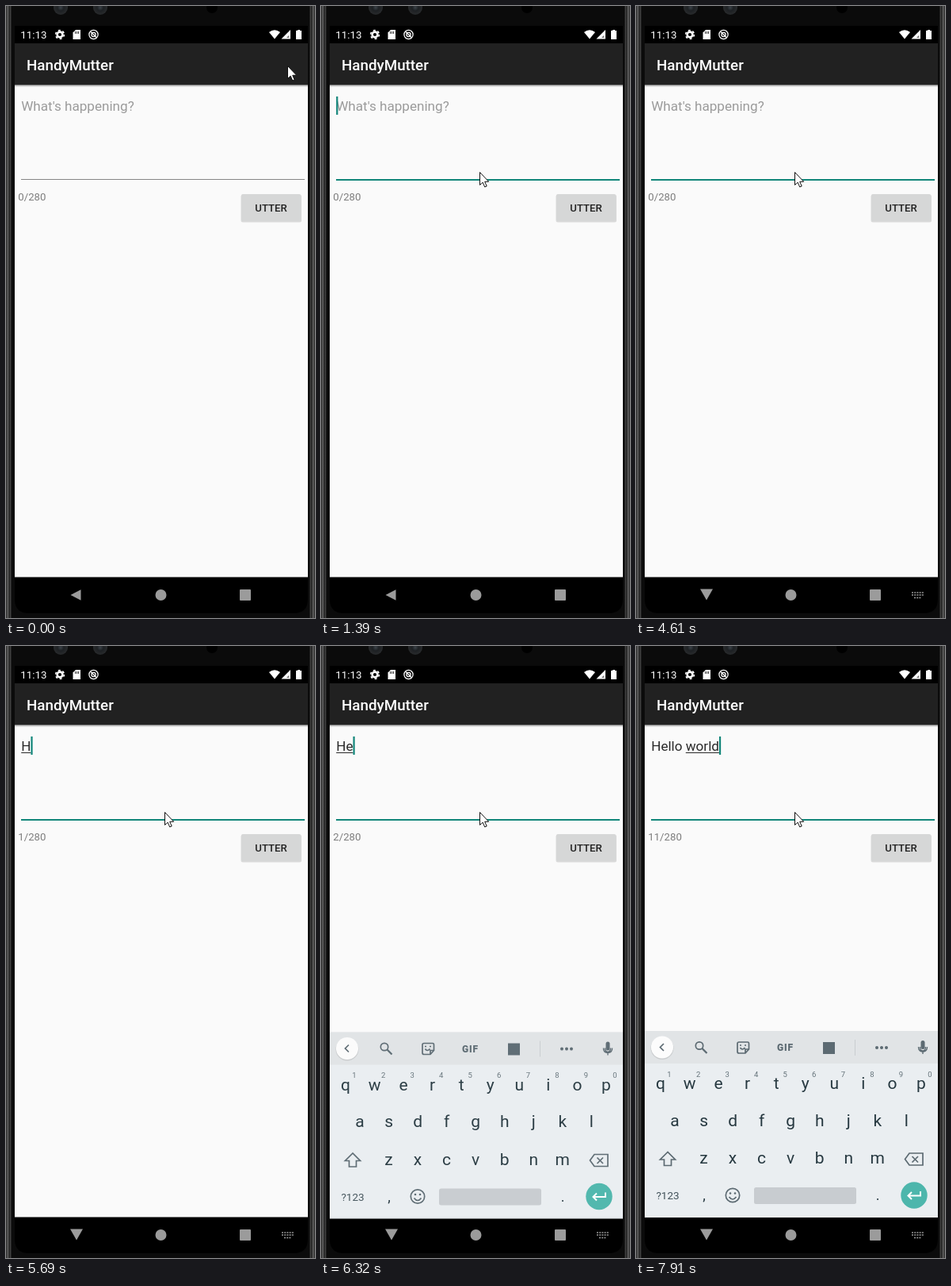
Animation of 390 by 771 pixels, one loop 8 s. Source, as an HTML page:

```html
<!DOCTYPE html>
<html lang="en">
<head>
<meta charset="utf-8">
<title>Composer</title>
<style>
  html, body { margin: 0; width: 100%; height: 100%; overflow: hidden; background: #0b0b0b; }
  svg { display: block; width: 100%; height: 100%; }
  text { font-family: Roboto, sans-serif; white-space: pre; }
  .medium { font-weight: 500; }
  .mid { text-anchor: middle; }
  .line { fill: none; stroke: #5c6a72; stroke-width: 1.7; }
</style>
</head>
<body>
<svg viewBox="0 0 390 771">
  <defs>
    <clipPath id="screen"><path d="M11 25H381V747Q381 765 363 765H29Q11 765 11 747Z"/></clipPath>
    <linearGradient id="barShadow" x2="0" y2="1">
      <stop stop-color="#000" stop-opacity=".3"/><stop offset="1" stop-color="#000" stop-opacity="0"/>
    </linearGradient>
    <linearGradient id="rim">
      <stop stop-color="#2a2a2a"/><stop offset=".35" stop-color="#606060"/>
      <stop offset=".6" stop-color="#1c1c1c"/><stop offset=".82" stop-color="#484848"/>
      <stop offset="1" stop-color="#0b0b0b"/>
    </linearGradient>
    <radialGradient id="lens">
      <stop stop-color="#3b4248"/><stop offset=".45" stop-color="#1d2023"/><stop offset="1" stop-color="#292b2d"/>
    </radialGradient>
  </defs>

  <!-- phone body -->
  <rect width="390" height="771" fill="#0b0b0b"/>
  <rect id="edge" width="7" height="771" fill="url(#rim)"/>
  <use href="#edge" transform="matrix(-1 0 0 1 390 0)"/>
  <circle cx="69" cy="2" r="9" fill="url(#lens)"/>
  <circle cx="119" cy="2" r="9" fill="url(#lens)"/>
  <circle cx="260" cy="2" r="7" fill="#000"/>

  <g clip-path="url(#screen)">
    <rect x="11" y="25" width="370" height="740"/>
    <rect x="11" y="99" width="370" height="620.5" fill="#fafafa"/>
    <rect x="11" y="47" width="370" height="52.500" fill="#212121"/>
    <rect x="11" y="99.500" width="370" height="3" fill="url(#barShadow)"/>

    <!-- status bar -->
    <g fill="#fff">
      <text x="18.300" y="41" font-size="13.300">11:13</text>
      <circle cx="68" cy="36" r="3.4" fill="none" stroke="#fff" stroke-width="2.6"/>
      <circle cx="68" cy="36" r="5.4" fill="none" stroke="#fff" stroke-width="1.6" stroke-dasharray="2.83"/>
      <path d="M88 30H94V42H84.500V33.500Z"/>
      <path d="M87.500 32V35M89.500 32V35M91.500 32V35" stroke="#000" stroke-width=".8"/>
      <g fill="none" stroke="#fff" stroke-width="1.3">
        <circle cx="110.500" cy="36" r="5.6"/><circle cx="110.500" cy="36" r="2.6"/><path d="M107 32.500L114 39.500"/>
      </g>
      <path d="M332 33Q339 27.500 346 33L339 41.500Z"/>
      <path d="M347.500 41.500L359 30V41.500Z"/>
      <path d="M354 40L357 37V40Z" fill="#777"/>
      <path d="M368 30H371V31H373V42H366V31H368Z"/>
      <text class="medium" x="26" y="81" font-size="18.800">HandyMutter</text>
    </g>

    <!-- compose form -->
    <text id="hint" x="19.200" y="132" font-size="17.100" fill="#9b9b9b">What's happening?</text>
    <text id="typed" x="19.200" y="132" font-size="17.100" fill="#2a2a2a"></text>
    <rect id="underline" y="134" height="1" fill="#2a2a2a"/>
    <rect id="caret" y="114" width="2.200" height="23" fill="#12867a"/>
    <rect id="field" x="19" width="358"/>
    <text id="counter" x="15.300" y="245.400" font-size="13.200" fill="#7d7d7d"></text>
    <rect x="296.500" y="237.500" width="76.500" height="35" rx="2.500" fill="#000" opacity=".13"/>
    <rect x="297" y="237" width="75" height="34" rx="2" fill="#d6d7d7"/>
    <text class="medium mid" x="334.500" y="259.300" font-size="13.200" fill="#222">UTTER</text>

    <!-- keyboard -->
    <g id="keyboard" fill="#263840">
      <rect x="11" y="485" width="370" height="235" fill="#eaeef1"/>
      <rect x="11" y="485" width="370" height="41" fill="#e1e4e6"/>
      <circle cx="33" cy="506.500" r="14.500" fill="#000" opacity=".1"/>
      <circle cx="33" cy="505.500" r="14" fill="#fcfcfc"/>
      <g class="line">
        <path d="M35 501L30.500 505.500L35 510"/>
        <circle cx="80" cy="503.500" r="4.700"/><path d="M83.500 507L89.500 513" stroke-width="2.200"/>
        <path d="M130 499H141Q142.500 499 142.500 501V508L138 513H130Q128 513 128 511V501Q128 499 130 499ZM138 513V508H142.500M131.500 506Q134 510 137.500 506M131 503H133M137 503H139"/>
        <path d="M358.500 505Q358.500 510 362 510T365.500 505M362 510V514M356.500 505Q356.500 511 362 511T367.500 505" stroke-width="1.400"/>
        <!-- shift, backspace, smiley -->
        <path d="M40 637.500L30.500 647H35.500V654.500H44.500V647H49.500Z"/>
        <path d="M345 639H362V654H345L339.500 646.500ZM348.500 643L356 650.500M356 643L348.500 650.500"/>
        <circle cx="122" cy="692" r="8.700"/><path d="M117.500 694Q122 700 126.500 694"/>
      </g>
      <g fill="#5c6a72">
        <text class="mid" x="188.500" y="510" font-size="12" font-weight="900" letter-spacing=".8">GIF</text>
        <rect x="236" y="499" width="15" height="15"/>
        <rect x="276" y="496" width="1" height="20" fill="#c9cdd0"/>
        <circle cx="304" cy="506" r="2"/><circle cx="310" cy="506" r="2"/><circle cx="316" cy="506" r="2"/>
        <rect x="359.500" y="497" width="5" height="11" rx="2.500"/>
        <circle cx="119" cy="689.500" r="1.300"/><circle cx="125" cy="689.500" r="1.300"/>
      </g>
      <text class="mid" x="40" y="697" font-size="13.500" fill="#42525a">?123</text>
      <text class="mid" x="86" y="698" font-size="18">,</text>
      <text class="mid" x="305" y="698" font-size="18">.</text>
      <rect x="149" y="682" width="129" height="21" rx="2.500" fill="#c8ccd0"/>
      <circle cx="351" cy="692" r="16.700" fill="#4db6ac"/>
      <path d="M359 687V692.500H343.500M348 688L343.500 692.500L348 697" fill="none" stroke="#fff" stroke-width="2"/>
    </g>

    <!-- navigation bar -->
    <g fill="#9b9b9b">
      <path id="back"/>
      <circle cx="195.500" cy="742" r="7"/>
      <rect x="295" y="735" width="14" height="14" rx="1"/>
      <path id="switcher" d="M348 739H363M348 742H363M351 745.500H360" stroke="#9b9b9b" stroke-width="1.700" stroke-dasharray="2 1.200"/>
    </g>
  </g>

  <path id="pointer" d="M.5 .5V16.500L4.200 13.200L6.700 19L9.200 18L6.700 12.300H11.700Z" fill="#fff" stroke="#111"/>
</svg>

<script>
const LOOP = 8000;
const MESSAGE = "Hello world";
const $ = id => document.getElementById(id);
const setAttrs = (el, attrs) => { for (const k in attrs) el.setAttribute(k, attrs[k]); };
const show = (el, on) => el.style.display = on ? "" : "none";

// Each track lists [start ms, ...values]; a value holds until the next start.
const pointerTrack = [[0, 355, 75], [250, 330, 99], [370, 284, 139], [490, 249, 163],
  [640, 222, 186], [760, 207, 200], [880, 202, 205], [1000, 200, 209]];
const typingTrack = [[0, 0], [4730, 1], [6320, 2], [6440, 4], [6560, 5], [6810, 6],
  [6960, 7], [7100, 8], [7350, 9], [7630, 10], [7910, 11]];
const keyboardTrack = [[0, 235, 0], [6200, 71, .5], [6320, 1.5, .97], [6440, 0, 1]];
const caretToggles = [1000, 1660, 2070, 2630, 3180, 3690, 4070, 4610, 4730, 5270, 5690, 6200, 6320];
const FOCUS = 1000, NAV_CHANGE = 3820;

const at = (track, t) => track.findLast(step => step[0] <= t).slice(1);

function addLabel(text, x, y, size, fill) {
  const el = document.createElementNS("http://www.w3.org/2000/svg", "text");
  setAttrs(el, { x, y, "font-size": size, fill, class: "mid" });
  el.textContent = text;
  $("keyboard").append(el);
}

[["qwertyuiop", 31, 558], ["asdfghjkl", 49, 604.5], ["zxcvbnm", 85.5, 652]].forEach(([row, left, y], r) =>
  [...row].forEach((key, i) => {
    const x = left + i * 36.55;
    addLabel(key, x, y, 21, "#263840");
    if (r === 0) addLabel((i + 1) % 10, x + 11, 542.5, 9.5, "#65737a");
  }));

let shownLength = -1;
let caretX = 0;

function updateText(length) {
  if (length === shownLength) return;
  shownLength = length;
  const text = MESSAGE.slice(0, length);
  const wordStart = text.lastIndexOf(" ") + 1;
  const typed = $("typed");
  typed.textContent = text;
  const widthOf = n => n ? typed.getSubStringLength(0, n) : 0;
  const left = 19.2 + widthOf(wordStart);
  caretX = 19.2 + widthOf(length);
  setAttrs($("underline"), { x: left, width: caretX - left });
  $("counter").textContent = length + "/280";
  show($("hint"), !length);
}

function render(t) {
  updateText(at(typingTrack, t)[0]);

  setAttrs($("caret"), { x: caretX });
  show($("caret"), caretToggles.filter(time => time <= t).length % 2);

  const focused = t >= FOCUS;
  setAttrs($("field"), focused ? { y: 218, height: 2, fill: "#12867a" } : { y: 218, height: 1, fill: "#858585" });

  const [x, y] = at(pointerTrack, t);
  setAttrs($("pointer"), { transform: `translate(${x} ${y})` });

  const [drop, opacity] = at(keyboardTrack, t);
  setAttrs($("keyboard"), { transform: `translate(0 ${drop})`, opacity });

  const keyboardNav = t >= NAV_CHANGE;
  setAttrs($("back"), { d: keyboardNav ? "M81 734.500H97L89 748.500Z" : "M81.500 742L94.500 735.200V748.800Z" });
  show($("switcher"), keyboardNav);
}

const start = performance.now();
function tick() {
  render((performance.now() - start) % LOOP);
  requestAnimationFrame(tick);
}
tick();
</script>
</body>
</html>
```
